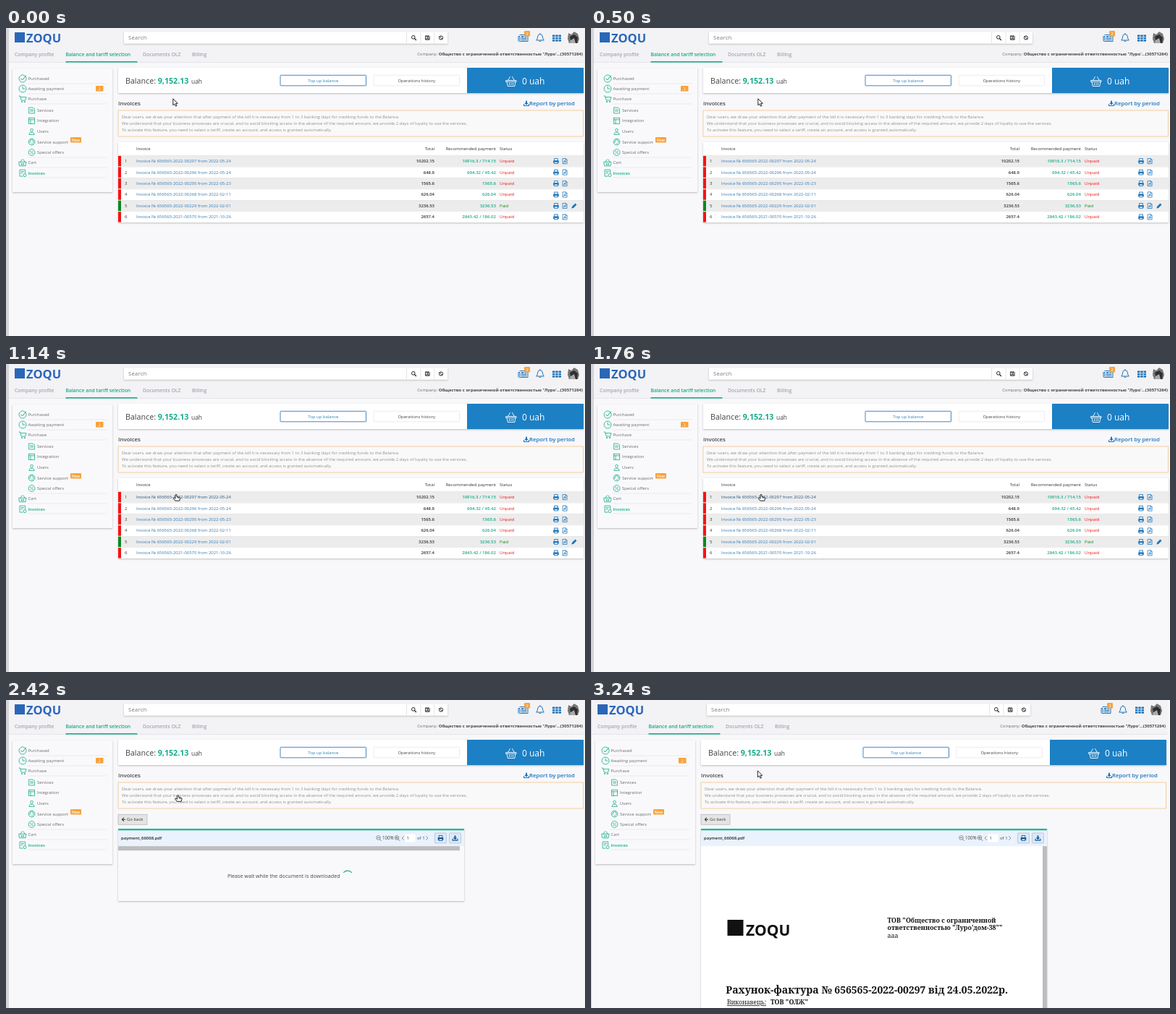
Write an HTML page that moves like this. It is 800x426 px and loops after 3260 ms.

```html
<!DOCTYPE html>
<html lang="en">
<head>
<meta charset="utf-8">
<title>Invoices</title>
<style>
  html, body { margin: 0; width: 100%; height: 100%; overflow: hidden; background: #f8f7fa; }
  svg { display: block; width: 800px; height: 426px; font-family: "Open Sans", sans-serif; }
  text { white-space: pre; }
  .doc { font-family: "Noto Serif", serif; fill: #111; }
</style>
</head>
<body>
<svg id="stage" viewBox="0 0 800 426"></svg>
<script>
const LOOP = 3260, LOADING_AT = 2160, READY_AT = 2560;
const BLUE = '#1c75bc', LINK = '#337ab7', TEAL = '#14ab86', GREY = '#6b6b6b', ORANGE = '#f8a23c', RED = '#f51414';

const rect = (x, y, w, h, fill, more = '') =>
  `<rect x="${x}" y="${y}" width="${w}" height="${h}" fill="${fill}" ${more}/>`;
const text = (x, y, s, { size = 5.94, fill = GREY, weight = 400, anchor = 'start', more = '' } = {}) =>
  `<text x="${x}" y="${y}" font-size="${size}" fill="${fill}" font-weight="${weight}" text-anchor="${anchor}" ${more}>${s}</text>`;
const line = (d, stroke, width = 0.8, more = '') =>
  `<path d="${d}" fill="none" stroke="${stroke}" stroke-width="${width}" stroke-linecap="round" stroke-linejoin="round" ${more}/>`;
const shape = (d, fill, more = '') => `<path d="${d}" fill="${fill}" ${more}/>`;
const circle = (x, y, r, stroke, width = 0.8, fill = 'none') =>
  `<circle cx="${x}" cy="${y}" r="${r}" fill="${fill}" stroke="${stroke}" stroke-width="${width}"/>`;
const at = (x, y, s) => `<g transform="translate(${x} ${y})">${s}</g>`;
const panel = (x, y, w, h, fill = '#fff') => rect(x, y, w, h, fill, 'filter="url(#shadow)"');

const icons = {
  check: c => circle(0, 0, 5, c) + line('M-2.3 0L-.5 2L4.5-4', c, 1),
  clock: c => circle(0, 0, 5, c) + line('M0-3V0H3', c),
  cart: c => line('M-5-4H-3.4L-1.8 2H3.6L5-2.4H-3', c) + circle(-1, 4, .8, c) + circle(3, 4, .8, c),
  sheet: c => line('M-3.5-4H2L4-2V4H-3.5ZM-2-1H2M-2 1H2', c),
  board: c => rect(-4, -4, 8, 8, 'none', `stroke="${c}" stroke-width=".8"`) + line('M-4-1.5H4M-1.5-1.5V4', c),
  users: c => circle(0, -1.8, 1.9, c) + line('M-3.6 4C-3.6 .2 3.6 .2 3.6 4Z', c),
  support: c => circle(0, 0, 4.4, c) + line('M-2.5 1V-.5A2.5 2.5 0 0 1 2.5-.5V1M0 2.5H1.5', c),
  offer: c => circle(0, 0, 4.4, c) + line('M-1.8 1.8L1.8-1.8', c) + circle(-1.5, -1.4, .6, c, .6) + circle(1.5, 1.4, .6, c, .6),
  basket: c => line('M-5-1H5L4 4.5H-4ZM-3-1L-1-4.5M3-1L1-4.5M-1.6 1V3M0 1V3M1.6 1V3', c),
  bill: c => line('M3.5 0V-4.5H-4V4.5H0M-2-2H1.5M-2 0H0', c) + circle(3, 3, 2, c),
  printer: c => shape('M-3.8-.8H3.8V2.6H-3.8Z', c) + rect(-2.3, -3.4, 4.6, 2.9, '#fff', `stroke="${c}" stroke-width=".9"`) +
    rect(-2.3, 1, 4.6, 2.4, '#fff', `stroke="${c}" stroke-width=".9"`),
  pdf: c => line('M-2.8-3.6H1L2.8-1.8V3.6H-2.8ZM1-3.6V-1.8H2.8M-1.5 2L0-1.2L1.6 1.2L-1.2 .9', c, .75),
  pencil: c => shape('M-3.5 3.5L-3 1L1.5-3.3L3.5-1.3L-1 3Z', c),
  lens: c => circle(-.7, -.7, 2.3, c, 1) + line('M1.1 1.1L3 3', c, 1.3),
  download: c => shape('M-1-3.5H1V-.5H2.8L0 2.2L-2.8-.5H-1Z', c) + line('M-3.4 1.4V3.2H3.4V1.4', c, 1.2)
};
const icon = (name, x, y, c) => at(x, y, icons[name](c));

function header() {
  const cells = [0, 1, 2].flatMap(r => [0, 1, 2].map(c => rect(755 + c * 4.3, 9.5 + r * 3.3, 3.4, 2.5, BLUE)));
  const tabs = [[12, 'Company profile'], [82.5, 'Balance and tariff selection'], [189, 'Documents OLZ'], [257, 'Billing']];
  return rect(4, 0, 796, 47, '#f3f2f5') + rect(4, 47, 796, .8, '#e3e2e6') +
    rect(12, 6, 14, 14, '#2a67b8') + text(28, 20.2, 'ZOQU', { size: 16.5, fill: '#2a67b8', weight: 700 }) +
    panel(163, 5.5, 447, 16) + text(169, 15.8, 'Search', { size: 7.6, fill: '#777', more: 'letter-spacing=".3"' }) +
    line('M553.5 6V21M573 6V21M592 6V21', '#dcdcdc', .7) + icon('lens', 563.5, 13.5, '#222') +
    at(582.5, 13.5, line('M-2.6-2.6H1.8L2.6-1.8V2.6H-2.6ZM-1.2-2.4V-.8H1.2V-2.4M-1.4 2.4V.8H1.4V2.4', '#222', .9)) +
    circle(601, 13.5, 2.6, '#222', 1) + line('M599.3 11.8L602.7 15.2', '#222', 1) +
    at(714.5, 14, line('M-4.5-4.5H6.5V4.5H-5Q-6.5 4.5-6.5 3V-2.5H-4.5V3M-2.5 .5H4.5M-2.5 2.5H4.5', BLUE, 1) + rect(-2.5, -2.8, 3.2, 2, BLUE) + line('M2-2.5H4.5M2-1H4.5', BLUE, .8)) +
    rect(716, 4, 8, 7.5, ORANGE, 'rx="1"') + text(720, 9.8, '2', { size: 5.5, fill: '#fff', anchor: 'middle' }) +
    at(738, 13, line('M-5 3.7Q-3.4 2.2-3.4-1Q-3.2-4.2 0-4.5Q3.2-4.2 3.4-1Q3.4 2.2 5 3.7ZM0-5.5V-4.5M-1.2 5.2Q0 6.3 1.2 5.2', BLUE, 1)) +
    cells.join('') +
    shape('M777 7L781 9L785 5L790 8L792 15L790 21H778L776 15Z', '#777') + shape('M779 12L785 9L790 13L789 21H781Z', '#2e2e30') + shape('M780 17L785 14L787 21H779Z', '#aaa') +
    tabs.map(([x, s], i) => text(x, 39.2, s, { size: 6.82, weight: 600, fill: i == 1 ? TEAL : '#a4a6ae' })).join('') +
    rect(82.5, 46, 99, 1.6, TEAL) +
    text(797, 38.3, 'Company: <tspan font-weight="700" fill="#444">Общество с ограниченной ответственностью "Луро\'...(30571264)</tspan>', { anchor: 'end' });
}

function sidebar() {
  const items = [
    ['check', 'Purchased', 70], ['clock', 'Awaiting payment', 84], ['cart', 'Purchase', 98],
    ['sheet', 'Services', 114, 1], ['board', 'Integration', 128.3, 1], ['users', 'Users', 143, 1],
    ['support', 'Service support', 157.5, 1], ['offer', 'Special offers', 172, 1],
    ['basket', 'Cart', 186.3], ['bill', 'Invoices', 200.6]
  ];
  return panel(9, 56, 138, 171, '#f9f9fb') +
    items.map(([name, label, y, sub]) => icon(name, sub ? 35.5 : 23, y, TEAL) +
      text(sub ? 43 : 30.5, y + 2.1, label, label == 'Invoices' ? { fill: TEAL, weight: 600 } : {})).join('') +
    line([77, 91, 105, 179, 193, 207].map(y => `M30 ${y}H139`).join(''), '#dfdfe2', .6) +
    rect(124, 80, 10.5, 7.5, ORANGE) + text(129.2, 85.8, '2', { size: 5.3, fill: '#fff', anchor: 'middle' }) +
    rect(89, 151, 15, 7.5, ORANGE, 'rx="1"') + text(96.5, 156.5, 'New', { size: 5, fill: '#fff', weight: 600, anchor: 'middle' });
}

function account() {
  const notes = [
    'Dear users, we draw your attention that after payment of the bill it is necessary from 1 to 3 banking days for crediting funds to the Balance.',
    'We understand that your business processes are crucial, and to avoid blocking access in the absence of the required amount, we provide 2 days of loyalty to use the services.',
    'To activate this feature, you need to select a tariff, create an account, and access is granted automatically.'
  ];
  return panel(155, 55, 643, 35) + rect(637, 55, 161, 35, '#1c80c4') +
    text(165, 77, 'Balance:', { size: 10.7, fill: '#444' }) + text(209.7, 77, '9,152.13', { size: 10.7, fill: TEAL, weight: 700 }) +
    text(256, 77, 'uah', { size: 8.45, fill: '#444' }) +
    rect(379, 65.3, 118.5, 14.5, '#fff', `stroke="${LINK}" stroke-width=".9" rx=".8"`) +
    text(438.3, 74.7, 'Top up balance', { fill: '#2a80c0', anchor: 'middle' }) +
    rect(508, 65.3, 118.5, 14.5, '#fff', 'stroke="#e8e8ea" stroke-width=".8" rx=".8"') +
    text(567.2, 74.7, 'Operations history', { fill: '#444', anchor: 'middle' }) +
    at(698, 74, line('M-7-1.5H7V.3H-7ZM-6 .3L-4.8 6.5H4.8L6 .3M-4.5-1.5L-1.5-6.5M4.5-1.5L1.5-6.5M-2.5 2.2V4.6M0 2.2V4.6M2.5 2.2V4.6', '#fff', .9)) +
    text(713, 77.8, '0 uah', { size: 12, fill: '#fff' }) +
    text(155, 107.3, 'Invoices', { size: 7.9, fill: '#444', weight: 600 }) +
    icon('download', 719, 104.3, BLUE) + text(723, 107.2, 'Report by period', { size: 7.8, fill: BLUE, weight: 600 }) +
    rect(155, 114, 642.5, 36, '#faf9fa', 'stroke="#efcb92" stroke-width=".9"') +
    notes.map((s, i) => text(160, 125.3 + i * 8.7, s, { fill: '#8f8f92' })).join('');
}

function invoiceList() {
  const rows = [
    ['2022-00297', '2022-05-24', '10202.15', '10916.3 / 714.15'],
    ['2022-00296', '2022-05-24', '648.9', '694.32 / 45.42'],
    ['2022-00295', '2022-05-23', '1565.6', '1565.6'],
    ['2022-00268', '2022-02-11', '626.04', '626.04'],
    ['2022-00229', '2022-02-01', '3236.53', '3236.53'],
    ['2021-00570', '2021-10-26', '2657.4', '2843.42 / 186.02']
  ];
  const dark = { fill: '#333' }, step = 15.45;
  return panel(155, 158, 643, 111) + text(180, 169.2, 'Invoice', dark) + text(592, 169.2, 'Total', { ...dark, anchor: 'end' }) +
    text(677, 169.2, 'Recommended payment', { size: 6.05, ...dark, anchor: 'end' }) + text(682, 169.2, 'Status', dark) +
    rows.map(([id, date, total, due], i) => {
      const top = 176.4 + i * step, y = top + 9.7, mid = top + 7.7, paid = i == 4;
      return rect(155, top, 643, step, i % 2 ? '#fff' : '#ececec') + rect(155, top, 643, .5, '#dedede') +
        rect(155, top + .5, 4, step - 1, paid ? '#0a8a1e' : RED) + text(164, y, i + 1, dark) +
        text(180, y, `Invoice № 656565-${id} from ${date}`, { fill: LINK, more: i ? '' : 'id="link"' }) +
        text(592, y, total, { fill: '#333', weight: 600, anchor: 'end' }) +
        text(677, y, due, { size: 6.05, fill: TEAL, weight: 600, anchor: 'end' }) +
        text(682, y, paid ? 'Paid' : 'Unpaid', { size: 6.05, fill: paid ? '#0a8a1e' : RED }) +
        icon('printer', 760, mid, BLUE) + icon('pdf', 772.3, mid, BLUE) + (paid ? icon('pencil', 785, mid, BLUE) : '');
    }).join('');
}

function viewerBar() {
  const zoom = (x, sign) => circle(x, 190.5, 2.8, '#666', .7) + line(`M${x + 2} 192.6L${x + 4} 194.6${sign}`, '#666', .8);
  const button = (x, name) => rect(x, 184, 16, 14, '#dce9f8', 'stroke="#a9b9cc" stroke-width=".7" rx="1"') + icon(name, x + 8, 191, '#14579a');
  return rect(155, 158.3, 40, 14, '#e4e4e5', 'stroke="#b9b9bb" stroke-width=".8"') +
    line('M164.5 165.3H160.5M162.5 163.2L160.4 165.3L162.5 167.4', '#333', 1.1) + text(167, 167.4, 'Go back', { fill: '#333' }) +
    rect(155, 178, 478, 2.6, '#22b997') + rect(155, 180.6, 478, 21.6, '#eaf2fd') +
    text(159, 193.1, 'payment_66068.pdf', { fill: '#222', weight: 600 }) +
    zoom(514.5, 'M513.2 190.5H515.8') + text(520, 193.2, '100%', { size: 6.2, fill: '#444' }) +
    zoom(540, 'M538.7 190.5H541.3M540 189.2V191.8') +
    line('M549.5 188.5L547 191L549.5 193.5M580.5 188.5L583 191L580.5 193.5', '#777', .8) +
    rect(551.5, 185.5, 14, 11, '#fff') + text(553.5, 193.2, '1', { fill: '#333' }) + text(568, 193.2, 'of 1', { fill: '#444' }) +
    button(592.5, 'printer') + button(612.5, 'download');
}

const loading = () => panel(155, 178, 478, 100, '#f9f9fb') + viewerBar() + rect(155, 202.2, 472, 6, '#bdbdbf') +
  text(306, 245.8, 'Please wait while the document is downloaded', { size: 7.15, fill: '#444' }) +
  line('M466.6 238.4A7.6 7.6 0 0 1 477.4 238.4', TEAL, 1.2, 'id="spin"');

function invoicePage() {
  const doc = (x, y, s, size, weight = 400, more = '') => text(x, y, s, { size, weight, fill: '#111', more: `class="doc" ${more}` });
  return panel(155, 178, 478, 260) + viewerBar() + rect(627, 202.2, 6, 224, '#bdbdbf') +
    rect(191.5, 304, 22, 22, '#111') + text(217, 326, 'ZOQU', { size: 21, fill: '#111', weight: 700 }) +
    doc(412.5, 307.8, 'ТОВ "Общество с ограниченной', 8.9, 700) +
    doc(412.5, 318.2, 'ответственностью "Луро\'дом-38""', 8.9, 700) + doc(412.5, 328.8, 'aaa', 8.9) +
    doc(189.3, 406, 'Рахунок-фактура № 656565-2022-00297 від 24.05.2022р.', 14, 700) +
    doc(191, 421.3, 'Виконавець:', 8.4, 400, 'text-decoration="underline"') + doc(251, 421.3, 'ТОВ "ОЛЖ"', 8.9, 700);
}

const pointer = `<g id="arrow">${shape('M0 0V9L2.1 7.1L3.6 10.4L5.2 9.7L3.7 6.5H6.4Z', '#fff', 'stroke="#111" stroke-width=".9" stroke-linejoin="round"')}</g>
  <g id="hand">${shape('M-1 4.8V.8Q0-.6 1 .8V3.4L5 4.2Q5.8 4.6 5.5 6L4.7 9H-1.2L-4 5.4Q-3.6 4-2.4 4.8L-1 6Z', '#fff', 'stroke="#111" stroke-width=".9" stroke-linejoin="round"')}${line('M2.3 3.9V5.4M3.8 4.2V5.6', '#111', .6)}</g>`;

const stage = document.getElementById('stage');
stage.innerHTML = `<defs><filter id="shadow" x="-5%" y="-20%" width="110%" height="140%">
    <feDropShadow dx="0" dy="1" stdDeviation="1.3" flood-color="#000" flood-opacity=".25"/></filter></defs>
  <rect width="800" height="426" fill="#f8f7fa"/>
  <g id="page">${rect(-4, 0, 8, 426, '#d5d4d9')}${header()}${sidebar()}${account()}
    <g id="list">${invoiceList()}</g><g id="wait">${loading()}</g><g id="paper">${invoicePage()}</g></g>
  <g id="cursor">${pointer}</g>`;

const el = Object.fromEntries(['page', 'list', 'wait', 'paper', 'cursor', 'arrow', 'hand', 'link', 'spin']
  .map(id => [id, document.getElementById(id)]));
const show = (node, on) => node.setAttribute('display', on ? 'inline' : 'none');

// time, x, y of the pointer tip
const path = [[0, 230.8, 97.8], [660, 230.8, 97.8], [1060, 235, 180.2], [2180, 235, 180.2], [2420, 237.5, 131.5], [2580, 230.3, 97.8], [LOOP, 230.3, 97.8]];

function pointerAt(t) {
  const i = path.findIndex(p => p[0] > t), [t0, x0, y0] = path[i - 1], [t1, x1, y1] = path[i];
  const u = (t - t0) / (t1 - t0), k = t < LOADING_AT ? u * u * (3 - 2 * u) : u;
  return [x0 + (x1 - x0) * k, y0 + (y1 - y0) * k];
}

function draw(t) {
  const [x, y] = pointerAt(t);
  const isList = t < LOADING_AT, ready = t >= READY_AT;
  const hover = isList && y > 176.4, hand = hover || (!isList && !ready);
  show(el.list, isList);
  show(el.wait, !isList && !ready);
  show(el.paper, ready);
  show(el.hand, hand);
  show(el.arrow, !hand);
  el.link.setAttribute('fill', hover ? '#23527c' : LINK);
  el.page.setAttribute('transform', `translate(${ready ? -3 : 0} 0)`);
  el.cursor.setAttribute('transform', `translate(${x} ${y})`);
  el.spin.setAttribute('transform', `rotate(${(t - 2420) * 0.36} 472 243.7)`);
}

const start = performance.now();
function tick(now) {
  draw(Math.max(0, now - start) % LOOP);
  requestAnimationFrame(tick);
}
draw(0);
requestAnimationFrame(tick);
</script>
</body>
</html>
```
